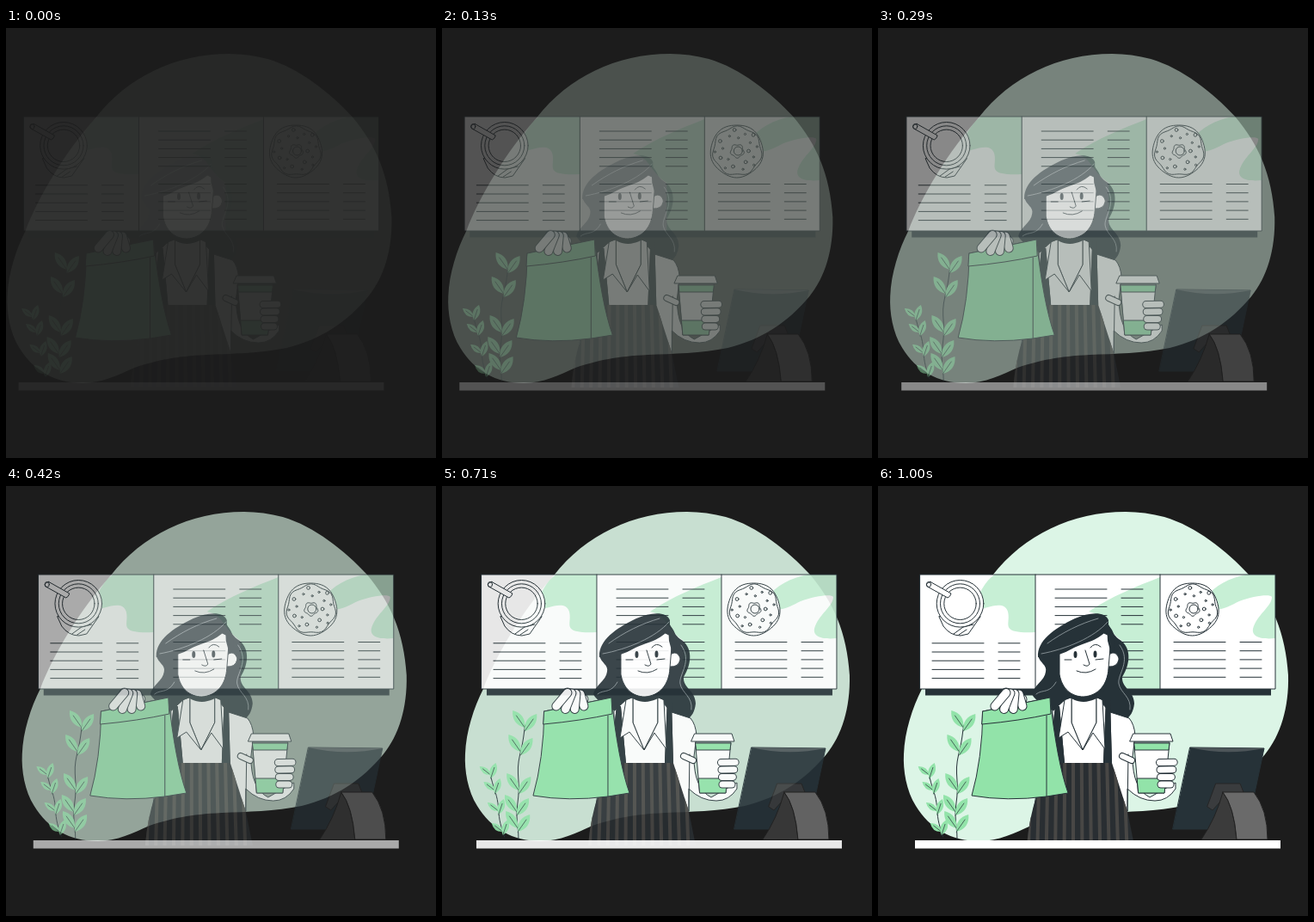
Recreate the animation shown at these times as an HTML page. Size 500x500 px, loop 1.04 s.

```html
<!DOCTYPE html>
<html lang="en">
<head>
<meta charset="utf-8">
<title>Cafe counter</title>
<style>
html, body { margin: 0; width: 100%; height: 100%; overflow: hidden; background: #1c1c1c; }
svg { display: block; width: 100vw; height: 100vh; }
.ink { fill: none; stroke: #263238; stroke-width: 1; stroke-linecap: round; stroke-linejoin: round; }
.white { fill: #fff; }
.green { fill: #92e3a9; }
.pale { fill: #c7efd5; }
.dark { fill: #263238; }
.none { stroke: none; }
</style>
</head>
<body>
<svg viewBox="0 0 500 500">
<defs>
  <clipPath id="apron"><path d="M206 256H211L217 322H262L265 248H270L272 322L290 378L298 418H173Q176 385 184 362L197 335Z"/></clipPath>
</defs>
<g id="scene">
  <g class="layer">
    <path fill="#dcf5e6" d="M288 30C303 30 318 32 333 36C370 47 405 75 431 103C458 135 474 170 477 220C478 258 468 290 450 312C425 342 395 362 355 372C325 378 290 379 262 380C225 382 205 386 178 395C160 403 140 413 118 413C85 413 60 398 44 372C33 355 29 330 30 312C31 285 40 258 51 236C66 196 98 143 133 104C170 57 225 30 288 30Z"/>
  </g>

  <g class="layer ink">
    <path class="dark none" d="M55 236H457V243.5H55Z"/>
    <path class="white none" d="M49 103H462V236H49Z"/>
    <g class="pale none">
      <path d="M136 103C124 110 118 125 108 146C128 142 146 132 151 146C154 158 146 166 160 169Q168 171 183 170V103Z"/>
      <path d="M328 106C300 117 272 128 245 146C265 150 262 165 284 180V236H328Z"/>
      <path d="M462 103H428C408 107 392 116 380 130L384 140C395 148 408 140 420 134C436 128 456 125 458 129C458 140 440 150 436 166C434 178 452 178 462 177Z"/>
    </g>
    <path d="M49 103H462V236H49ZM183 103V236M328 103V236"/>
    <path id="menu"/>
    <!-- iced drink -->
    <path class="white" d="M71 152L76 163Q84 174 96 174L105 172L119 152Z"/>
    <path d="M88 172L99 164L111 161M94 173L103 167"/>
    <g class="white" id="glass"></g>
    <path class="white" d="M61 111.500L85 125Q84 129 81 130L57.500 117Q54 113 61 111.500Z"/>
    <ellipse cx="59" cy="114.500" rx="2.600" ry="3"/>
    <g id="donut"></g>
  </g>

  <g class="layer ink" id="plant"></g>

  <g class="layer ink">
    <!-- hair behind the head -->
    <path class="dark none" d="M262 152C270 160 268 168 280 178C295 187 294 206 284 222C283 235 298 238 298 253C297 263 293 268 289 271L205 263C197 255 183 251 179 242C181 232 194 226 195 216C197 208 188 206 186 197L210 180Z"/>
    <!-- shirt and arms -->
    <path class="white" d="M216 250H258L270 263L292 270Q298 277 299 290L296 315Q296 352 316 362L346 345V352Q337 366 322 366Q304 366 290 352V378Q277 360 270 330L200 335L181 377Q184 345 204 320L203 262Z"/>
    <path d="M291 312L290 378"/>
    <g clip-path="url(#apron)">
      <path class="none" fill="#292e32" d="M170 245H300V418H170Z"/>
      <path id="stripes" stroke="#484745" stroke-width="4" stroke-linecap="butt"/>
      <path class="dark none" d="M200 245H217V322H200ZM262 245H275V322H262Z"/>
    </g>
    <path class="white" d="M225 240V275L238 307L254 275V240"/>
    <path class="white" d="M217 249L210 293L221 286L238 307L225 275V246ZM261 249L264 306L250 287L238 307L254 275V246Z"/>
    <path class="dark none" d="M212 218C213 240 222 250 239 251C258 250 267 238 268 218Z"/>
    <!-- face -->
    <path class="white" d="M267 200C270 190 280 194 280 202Q278 211 268 210Z"/>
    <path class="white" d="M211 190V219C214 236 225 245 239 245C256 244 267 231 268 212L271 175L250 165Z"/>
    <path class="dark none" d="M186 199C185 180 204 166 229 154C245 147 264 145 268 156V165C258 180 240 182 228 188Q206 201 186 199ZM266 160C280 172 277 194 271 195L267 180Z"/>
    <path stroke="#9ba5a9" stroke-width=".8" d="M190 195C218 190 252 176 267 158M197 183C215 170 235 160 256 154M281 185C295 204 278 219 280 230C282 241 295 245 293 260M207 228C199 242 191 236 184 242"/>
    <g class="dark none"><ellipse cx="229.500" cy="196" rx="2" ry="4"/><ellipse cx="252.500" cy="195.500" rx="2" ry="4"/></g>
    <path d="M241 191L246 207Q244 211 239 208M231 215Q242 220 253 213M217 202H225M253 202L262 201M247 188Q252 181 259 187"/>
    <!-- bag -->
    <g class="green">
      <path d="M122 262L200 246Q208 320 221 357L196 361Q150 367 109 360Q121 318 122 262Z"/>
      <path d="M122 262L200 246L201 265Q165 273 121 277Z"/>
      <path d="M196 267V361"/>
    </g>
    <g id="grip"></g>
    <!-- cup -->
    <path class="white" d="M298 298H339L333 357H303Z"/>
    <path class="green" d="M298 299H339L338 307H299ZM301.500 340H335L333 357H303Z"/>
    <path class="white" d="M297 288H340L343 297H293Z"/>
    <g id="hold"></g>
  </g>

  <g class="layer ink">
    <path class="dark" d="M363 304L449 305L429 399H343Z"/>
    <path class="none" fill="#4d5559" d="M363 304L449 305Q405 314 363 304Z"/>
    <path fill="#3a3c3e" stroke="#262626" d="M393 346H421L425 356L399 366L389 377L383 373Z"/>
    <path fill="#3b3b3b" stroke="#222" d="M376 411Q393 386 401 356Q414 372 417 411Z"/>
    <path fill="#6a6a6a" stroke="#222" d="M401 356H437Q453 376 453 411H417Q414 372 401 356Z"/>
  </g>

  <g class="layer"><path class="white" d="M43 412H468V421.500H43Z"/></g>
</g>
</svg>
<script>
const $ = id => document.getElementById(id);
const each = (n, f) => Array.from({ length: n }, (_, i) => f(i));
const markup = (n, f) => each(n, f).join('');
const circle = (x, y, r) => `<circle cx="${x}" cy="${y}" r="${r}"/>`;

// Menu text: a long and a short line in every row.
const rows = (x, y) => markup(5, i => `M${x} ${y + i * 10.2}h60m17 0h25`);
$('menu').setAttribute('d', rows(63, 182.8) + rows(206, 120) + rows(206, 181.5) + rows(344, 181.5));

$('glass').innerHTML = markup(3, i => circle(95.5, 136.8, 27.3 - 4.3 * i));

// A closed ring whose radius swells in a number of lobes.
function ring(x, y, r, swell, lobes) {
  const points = each(60, i => {
    const a = i * Math.PI / 30, d = r + swell * Math.sin(lobes * a);
    return `${x + d * Math.cos(a)} ${y + d * Math.sin(a)}`;
  });
  return `<path d="M${points.join('L')}Z"/>`;
}
function sprinkle(i) {
  const a = i * 2.4, d = 5.4 * Math.sqrt(i + 6);
  return circle(366 + d * Math.cos(a), 143 + d * Math.sin(a), i % 3 ? 1.1 : 1.9);
}
$('donut').innerHTML = `<g class="white">${ring(365.5, 143, 30.5, .5, 5)}</g>`
  + ring(366, 143, 28, 1.2, 7) + ring(366, 143, 7.5, .8, 5) + circle(367, 143, 5) + markup(19, sprinkle);

$('stripes').setAttribute('d', markup(13, i => `M${178 + i * 9.8} 322L${175 + i * 10.4} 418`));

// A leaf runs from its base to its tip and bulges on both sides.
function leaf(x, y, dx, dy) {
  const bend = k => `${dx / 2 - k * dy} ${dy / 2 + k * dx}`;
  return `<g transform="translate(${x} ${y})"><path class="green none" d="M0 0Q${bend(.42)} ${dx} ${dy}Q${bend(-.42)} 0 0"/>
    <path stroke-width=".7" d="M0 0L${dx * .7} ${dy * .7}"/></g>`;
}
// A swaying stem carries a pair of leaves at each of the given heights.
function sprig(stemX, bottom, top, heights, left, right) {
  const stem = each(20, i => bottom + (top - bottom) * i / 19).map(y => `${stemX(y)} ${y}`);
  return `<path d="M${stem.join('L')}"/>`
    + heights.map(y => leaf(stemX(y), y, ...left) + leaf(stemX(y), y + 4, ...right)).join('');
}
$('plant').innerHTML =
  sprig(y => 91 + 9 * ((411 - y) / 132) ** 4 + Math.sin(y / 9), 411, 278, [281, 309, 354, 379, 398], [-14, -20], [14, -20])
  + sprig(y => 75 - (408 - y) * .2 + Math.sin(y / 8), 408, 333, [336, 354, 378, 402], [-13, -10], [6, -18]);

// Fingers are round strokes with a thin outline.
const stroke = (d, color, width) => `<path d="${d}" stroke="${color}" stroke-width="${width}"/>`;
const finger = (x, y, u, v, w) => {
  const d = `M${x} ${y}L${u} ${v}`;
  return stroke(d, '#263238', w) + stroke(d, '#fff', w - 2);
};
$('grip').innerHTML = finger(149, 241, 167, 248, 13)
  + markup(4, i => finger(164 - 5 * i, 242 - i / 2, 168 - 10.7 * i, 256 + 4 * Math.sin(i * Math.PI / 3), 11));
$('hold').innerHTML = markup(4, i => finger(329 - i / 2, 347 - 8.5 * i, 340 + 1.4 * i, 347 - 8.6 * i, 9))
  + finger(284, 314, 295, 319, 8);

// Solve cubic-bezier(0, 0, .58, 1) for a given progress.
function easeOut(x) {
  let lo = 0, hi = 1;
  for (let i = 0; i < 24; i++) {
    const s = (lo + hi) / 2;
    if (1.74 * s * s - .74 * s ** 3 < x) lo = s; else hi = s;
  }
  return 3 * lo * lo - 2 * lo ** 3;
}

const LOOP = 1040, STEP = 1000 / 24;
const layers = document.querySelectorAll('.layer');
const start = performance.now();

function draw() {
  const t = (performance.now() - start) % LOOP;
  const step = Math.min(24, Math.floor((t + 3.4) / STEP));
  const p = easeOut(Math.min(1, (step * STEP + 30) / 1000));
  $('scene').setAttribute('transform', `translate(${-30 * (1 - p)} 0)`);
  layers.forEach(g => g.setAttribute('opacity', p));
  requestAnimationFrame(draw);
}
draw();
</script>
</body>
</html>
```
